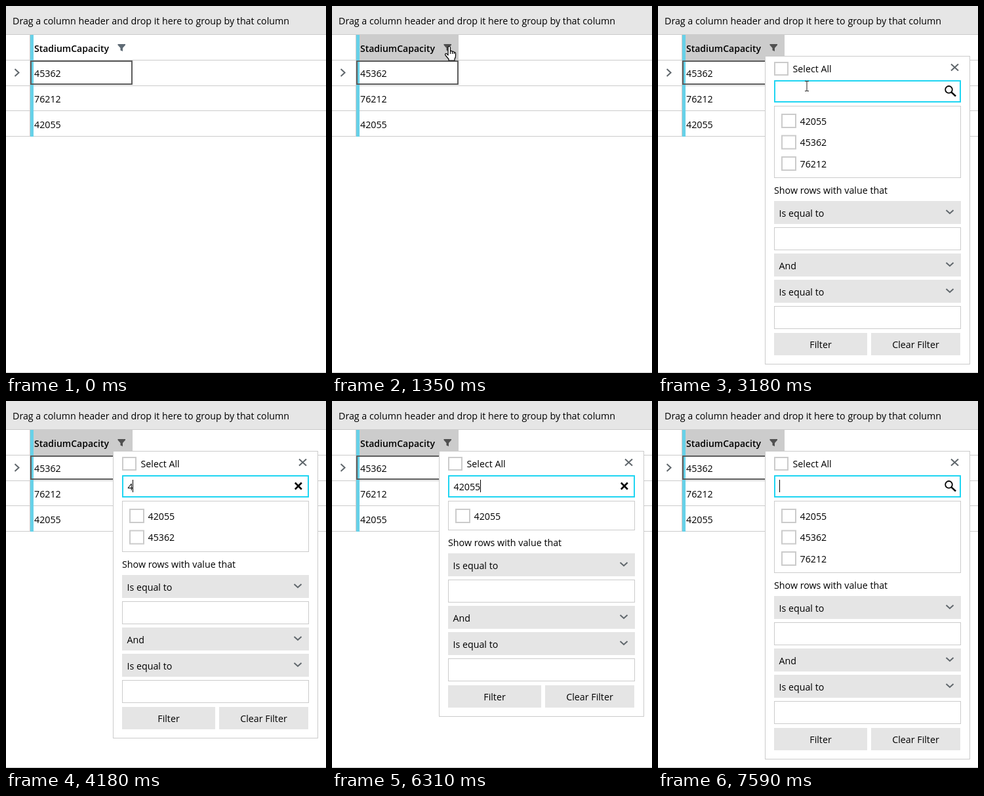
These frames come from a looping animation (488 by 559 pixels, 8000 ms). An HTML page:

```html
<!DOCTYPE html>
<html lang="en">
<head>
<meta charset="utf-8">
<title>Grid column filter</title>
<style>
  html, body { margin: 0; width: 100%; height: 100%; overflow: hidden; background: #fff; }
  svg { display: block; width: 488px; height: 559px; }
  text { font: 14.25px "Open Sans", "Noto Sans", sans-serif; fill: #000; white-space: pre; }
  .head { font-size: 14px; font-weight: 600; }
  .hint { font-style: italic; fill: #6b6b6b; }
  .mid { text-anchor: middle; }
  .line { fill: #cbcbcb; }
  .gray { fill: #e5e5e5; }
  .field { fill: #fff; stroke: #cbcbcb; }
  .check { fill: #fff; stroke: #cbcbcb; stroke-width: 2; }
  .mark { fill: none; stroke: #5f666b; stroke-width: 2; }
  .bold { fill: none; stroke: #000; stroke-width: 2.5; }
</style>
</head>
<body>
<svg viewBox="0 0 488 559">
  <rect width="488" height="43" fill="#e6e6e6"/>
  <rect class="line" y="43" width="488" height="1"/>
  <text x="10" y="28">Drag a column header and drop it here to group by that column</text>
  <rect class="line" y="558" width="488" height="1"/>
  <rect class="line" x="36" y="44" width="1" height="155"/>
  <g id="rows"></g>
  <rect x="37" y="44" width="5" height="155" fill="#67d1e8"/>
  <rect x="38" y="84" width="154" height="35" fill="none" stroke="#5c5c5c" stroke-width="2"/>
  <path class="mark" d="M13.5 96l6 5.5l-6 5.5"/>
  <rect id="hover" fill="#000" fill-opacity=".2"/>
  <text class="head" x="43" y="70">StadiumCapacity</text>
  <path id="funnel" d="M170.5 58H182v1.5L178 64v5l-3.5-1.500V64l-4-4.500z"/>

  <g id="popup">
    <rect id="panel" class="field" x="163.5" y="76.500" width="312"/>
    <rect class="check" x="178" y="86" width="20" height="19"/>
    <text x="205.5" y="101">Select All</text>
    <path class="mark" stroke-width="2.300" d="M447 88.500l11 10m0-10l-11 10"/>
    <rect id="search" x="177.500" y="113.500" width="284" height="33" fill="#fff"/>
    <text id="hint" class="hint" x="187" y="136">Search</text>
    <text id="typed" x="185.500" y="136"></text>
    <rect id="caret" y="120" width="1" height="19"/>
    <g id="lens" class="bold">
      <circle cx="443.500" cy="127.300" r="5.300" stroke-width="1.800"/>
      <path d="M447.500 131.300l6.500 6"/>
    </g>
    <path id="clear" class="bold" d="M440.800 124.500l10 10m0-10l-10 10"/>
    <rect id="list" class="field" x="177.500" y="152.500" width="284"/>
    <g id="items"></g>
    <g id="lower">
      <text x="177" y="286">Show rows with value that</text>
      <g id="fields"></g>
      <rect class="gray" x="177" y="498" width="142" height="34"/>
      <text class="mid" x="248" y="521">Filter</text>
      <rect class="gray" x="325" y="498" width="136" height="34"/>
      <text class="mid" x="393" y="521">Clear Filter</text>
    </g>
  </g>

  <g id="cursor">
    <path id="arrow" fill="#fff" stroke="#000" d="M.5 .5V16.500L4.200 13L6.800 19L9.300 18L6.800 12.200H11.800z"/>
    <path id="hand" fill="#fff" stroke="#000" stroke-width="1.200" stroke-linejoin="round"
      d="M-2 11V1.500Q-2-.500-.300-.500T1.500 1.500V7Q3 5.500 4.500 7.500Q6 6.500 7.200 8.500Q9.500 8 9.500 10.500V14Q9.500 16.500 8 18.500V21H-1V19L-6 13Q-7 11-5.500 10.500T-2 13zM1.500 7v4M4.500 7.500V11M7.200 8.500V11"/>
    <path id="beam" fill="none" stroke="#222" d="M-3-7.500H-1L0-7L1-7.500H3M0-7V7M-3 7.500H-1L0 7L1 7.500H3"/>
  </g>
</svg>
<script>
const LOOP = 8000;
const $ = id => document.getElementById(id);
const set = (el, attrs) => { for (const k in attrs) el.setAttribute(k, attrs[k]); };
const show = (el, on) => el.setAttribute("visibility", on ? "visible" : "hidden");

// Latest entry whose start time has been reached.
const at = (track, t) => track.reduce((hit, step) => step[0] <= t ? step : hit, track[0]);

// time, x, y, shape
const path = [
  [0, 0, 0, ""],
  [380, 214, 428, "arrow"], [450, 209, 386, "arrow"], [520, 203, 322, "arrow"],
  [590, 197, 252, "arrow"], [660, 191, 190, "arrow"], [730, 186, 138, "arrow"],
  [800, 181, 98, "arrow"], [870, 178, 66, "arrow"], [940, 176, 49, "arrow"],
  [1140, 176, 52, "arrow"], [1210, 177, 55, "arrow"], [1280, 178, 60, "hand"],
  [1350, 179, 62, "hand"],
  [2100, 184, 71, "hand"], [2170, 199, 89, "arrow"], [2240, 216, 109, "arrow"],
  [2310, 231, 127, "beam"], [2380, 227, 122, "beam"],
  [4110, 0, 0, ""]
];
const typing = [
  [0, ""], [4110, "4"], [4580, "42"], [5710, "420"], [6040, "4205"], [6310, "42055"],
  [6710, "4205"], [6910, "420"], [7040, "42"], [7190, "4"], [7520, ""]
];
const blink = [[0, false], [2710, true], [3180, false], [3710, true], [5250, false], [5710, true]];
const opening = [[0, 0, 0], [1570, 0.3, -29], [1640, 0.7, -9], [1750, 1, 0]];
const border = [[0, "#cbcbcb", 1], [2710, "#85dcec", 1.5], [2780, "#1fd5f2", 2]];
const values = ["42055", "45362", "76212"];
const rowTops = [44, 83, 122, 160, 199];

$("rows").innerHTML = rowTops.slice(1).map((y, i) =>
  `<rect class="line" y="${y - 1}" width="488" height="1"/>` +
  (i < 3 ? `<text x="43" y="${108 + 39 * i}">${["45362", "76212", "42055"][i]}</text>` : "")
).join("");

$("items").innerHTML = values.map((v, i) =>
  `<g transform="translate(0 ${32.5 * i})"><rect class="check" x="189" y="165" width="21" height="20"/>` +
  `<text x="216.5" y="180.500">${v}</text></g>`
).join("");

const combo = (y, label) =>
  `<rect class="gray" x="177" y="${y}" width="285" height="35"/>` +
  `<text x="184.500" y="${y + 23.5}">${label}</text>` +
  `<path class="mark" d="M439.500 ${y + 14}l5.500 5l5.500-5"/>`;
const input = y => `<rect class="field" x="177.500" y="${y + 0.5}" width="284" height="34"/>`;
$("fields").innerHTML =
  combo(297, "Is equal to") + input(337) + combo(377, "And") + combo(417, "Is equal to") + input(457);

function drawHover(t, y, shape) {
  let box = null;
  if (t >= 1570 || (shape && y >= 44 && y < 83)) box = [42, 44, 151, 38];
  else if (shape) {
    const i = rowTops.findIndex((top, k) => k > 0 && k < 4 && y >= top && y < rowTops[k + 1]);
    if (i > 0) box = [0, rowTops[i], 488, rowTops[i + 1] - rowTops[i] - 1];
  }
  show($("hover"), box);
  if (box) set($("hover"), { x: box[0], y: box[1], width: box[2], height: box[3] });
  $("funnel").setAttribute("fill", box && box[1] === 44 ? "#505050" : "#5f6b75");
}

function drawPopup(t) {
  const [, alpha, slide] = at(opening, t);
  set($("popup"), { opacity: alpha, transform: `translate(0 ${slide})` });

  const [, color, width] = at(border, t);
  const inset = (width - 1) / 2;
  set($("search"), {
    stroke: color, "stroke-width": width,
    x: 177.5 + inset, y: 113.5 + inset, width: 284 - 2 * inset, height: 33 - 2 * inset
  });

  const text = at(typing, t)[1];
  $("typed").textContent = text;
  show($("hint"), t < 2710);
  show($("lens"), !text);
  show($("clear"), text);
  show($("caret"), at(blink, t)[1]);
  $("caret").setAttribute("x", Math.round(185 + 8.15 * text.length));

  // The list follows the typed text a moment later.
  const query = at(typing, t - 70)[1];
  const count = values.filter(v => v.startsWith(query)).length;
  const lift = Math.floor(32.5 * (3 - count));
  [...$("items").children].forEach((item, i) => show(item, i < count));
  $("list").setAttribute("height", 109 - lift);
  $("panel").setAttribute("height", 469 - lift);
  $("lower").setAttribute("transform", `translate(0 ${-lift})`);
}

function draw(t) {
  const [, x, y, shape] = at(path, t);
  $("cursor").setAttribute("transform", `translate(${x} ${y})`);
  for (const id of ["arrow", "hand", "beam"]) show($(id), id === shape);
  drawHover(t, y, shape);
  drawPopup(t);
}

const start = performance.now();
function tick() {
  draw((performance.now() - start) % LOOP);
  requestAnimationFrame(tick);
}
tick();
</script>
</body>
</html>
```
